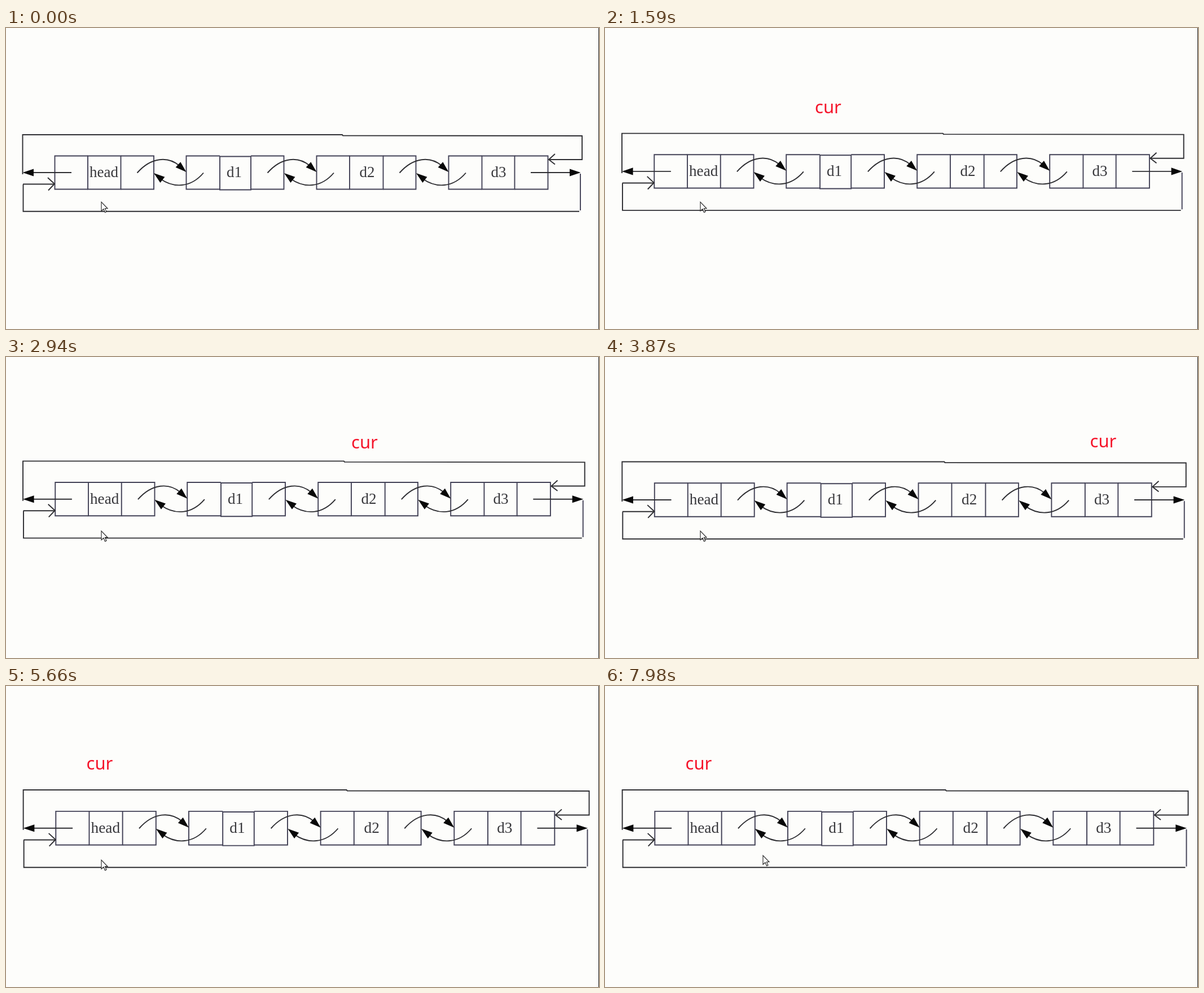
An HTML page with a canvas that plays this animation: 1051x533 px, repeating every 8000 ms.

```html
<!DOCTYPE html>
<html lang="en">
<head>
<meta charset="utf-8">
<title>Doubly linked list traversal</title>
<style>
  html, body { margin: 0; width: 100%; height: 100%; overflow: hidden; background: #fdfdfb; }
  canvas { display: block; }
</style>
</head>
<body>
<canvas id="stage" width="1051" height="533"></canvas>
<script>
const ctx = document.getElementById('stage').getContext('2d');
const LOOP = 8000;
const INK = '#2e2e32', BOX = '#424156', BLACK = '#080808';

// Each page: start time, diagram scale and offset, position of the "cur" label
const pages = [
  { from: 0, scale: 1, dx: 0, dy: 0 },
  { from: 500, scale: 1.0042, dx: 0.4, dy: -3.2, cur: [372, 151] },
  { from: 2080, scale: 1.0042, dx: 0.4, dy: -5.4, cur: [612, 162] },
  { from: 3870, scale: 1.008, dx: 0.6, dy: -5, cur: [859.5, 159.5] },
  { from: 5500, scale: 1.0115, dx: 0.8, dy: -7.2, cur: [142.5, 148] },
];

// Cell borders, text centre and text of each node; drop lowers the middle cell
const nodes = [
  { x: [86.5, 145, 203.5, 262], mid: 173.5, name: 'head', drop: 0 },
  { x: [319.5, 379, 434, 492.5], mid: 404.5, name: 'd1', drop: 1 },
  { x: [550.5, 609, 668.5, 726.5], mid: 640, name: 'd2', drop: 0 },
  { x: [784.5, 843.5, 901.5, 960.5], mid: 873, name: 'd3', drop: 0 },
];

// Pointer path: time, x, y
const pointerPath = [
  [7150, 169, 308], [7330, 310, 334], [7500, 499, 340],
  [7670, 400, 316], [7860, 262, 308], [7980, 280, 300],
];

function stroke(color = INK) {
  ctx.strokeStyle = color;
  ctx.lineWidth = 1.9;
  ctx.stroke();
}

function line(points, color) {
  ctx.beginPath();
  points.forEach(([x, y]) => ctx.lineTo(x, y));
  stroke(color);
}

function curve(x, y, bends) {
  ctx.beginPath();
  ctx.moveTo(x, y);
  ctx.bezierCurveTo(...bends);
  stroke();
}

function arrowHead(x, y, angle) {
  ctx.save();
  ctx.translate(x, y);
  ctx.rotate(angle);
  ctx.beginPath();
  ctx.moveTo(0, 0);
  ctx.lineTo(-19.5, -6.5);
  ctx.lineTo(-19.5, 6.5);
  ctx.fillStyle = BLACK;
  ctx.fill();
  ctx.restore();
}

function drawNode({ x: [left, a, b, right], mid, name, drop }) {
  const top = 226.5, bottom = 285.5;
  line([[a, top], [left, top], [left, bottom], [a, bottom]], BOX);
  line([[b, top], [right, top], [right, bottom], [b, bottom]], BOX);
  ctx.beginPath();
  ctx.rect(a, top + drop, b - a, bottom - top);
  stroke(BOX);
  ctx.font = '27px "Liberation Serif", "Times New Roman", serif';
  ctx.textAlign = 'center';
  ctx.fillStyle = '#38383c';
  ctx.fillText(name, mid, 264);
}

// Pair of curved links in front of the node whose left edge is x
function drawLinks(x) {
  curve(x - 87, 256.5, [x - 62, 228, x - 32, 227, x - 12, 244]);
  arrowHead(x, 255, 0.73);
  curve(x + 30.5, 256.5, [x + 8, 283, x - 22, 284, x - 46, 267]);
  arrowHead(x - 57.5, 257, Math.PI + 0.66);
}

function drawDiagram() {
  nodes.forEach(drawNode);
  nodes.slice(1).forEach(n => drawLinks(n.x[0]));

  // Outer loop from head to the last node
  line([[116, 256], [45, 256]]);
  arrowHead(29.5, 256, Math.PI);
  line([[29.5, 259], [29.5, 189], [596, 189], [597, 190.5], [1021, 191], [1021, 233], [962, 233]]);
  line([[973, 223], [962, 233], [973, 241.5]]);

  // Outer loop from the last node to head
  line([[930, 256], [1003, 256]]);
  arrowHead(1018.5, 256, 0);
  line([[1018, 258], [1018, 323]], BOX);
  line([[1016, 324.7], [30.5, 324.7], [30.5, 277]]);
  line([[30, 276.5], [86, 276.5]]);
  line([[74, 265], [86, 276], [75, 287.5]]);
}

function spline(p0, p1, p2, p3, u) {
  return p1 + 0.5 * u * (p2 - p0 + u * (2 * p0 - 5 * p1 + 4 * p2 - p3 + u * (3 * (p1 - p2) + p3 - p0)));
}

function pointerAt(t) {
  const path = pointerPath, last = path.length - 1;
  if (t <= path[0][0]) return path[0].slice(1);
  if (t >= path[last][0]) return path[last].slice(1);
  const i = path.findIndex(p => p[0] > t) - 1;
  const near = [-1, 0, 1, 2].map(k => path[Math.max(0, Math.min(last, i + k))]);
  const u = (t - near[1][0]) / (near[2][0] - near[1][0]);
  return [1, 2].map(axis => spline(...near.map(p => p[axis]), u));
}

function drawPointer([x, y]) {
  const shape = new Path2D('M0 0V16L4 12.5L6.5 18.5L9 17.5L6.5 11.5H11Z');
  ctx.save();
  ctx.translate(x, y);
  ctx.fillStyle = '#fff';
  ctx.fill(shape);
  ctx.strokeStyle = '#222';
  ctx.lineWidth = 1.1;
  ctx.stroke(shape);
  ctx.restore();
}

function draw(t) {
  const page = pages.findLast(p => p.from <= t);
  ctx.fillStyle = '#fdfdfb';
  ctx.fillRect(0, 0, 1051, 533);
  ctx.fillStyle = '#222';
  ctx.fillRect(1050, 0, 1, 533);

  ctx.save();
  ctx.translate(page.dx, page.dy);
  ctx.scale(page.scale, page.scale);
  drawDiagram();
  ctx.restore();

  if (page.cur) {
    ctx.font = '31px "Noto Sans", "Open Sans", sans-serif';
    ctx.textAlign = 'left';
    ctx.fillStyle = '#f5142a';
    ctx.fillText('cur', ...page.cur);
  }
  drawPointer(pointerAt(t));
}

const start = performance.now();
function tick() {
  draw((performance.now() - start) % LOOP);
  requestAnimationFrame(tick);
}
tick();
</script>
</body>
</html>
```
